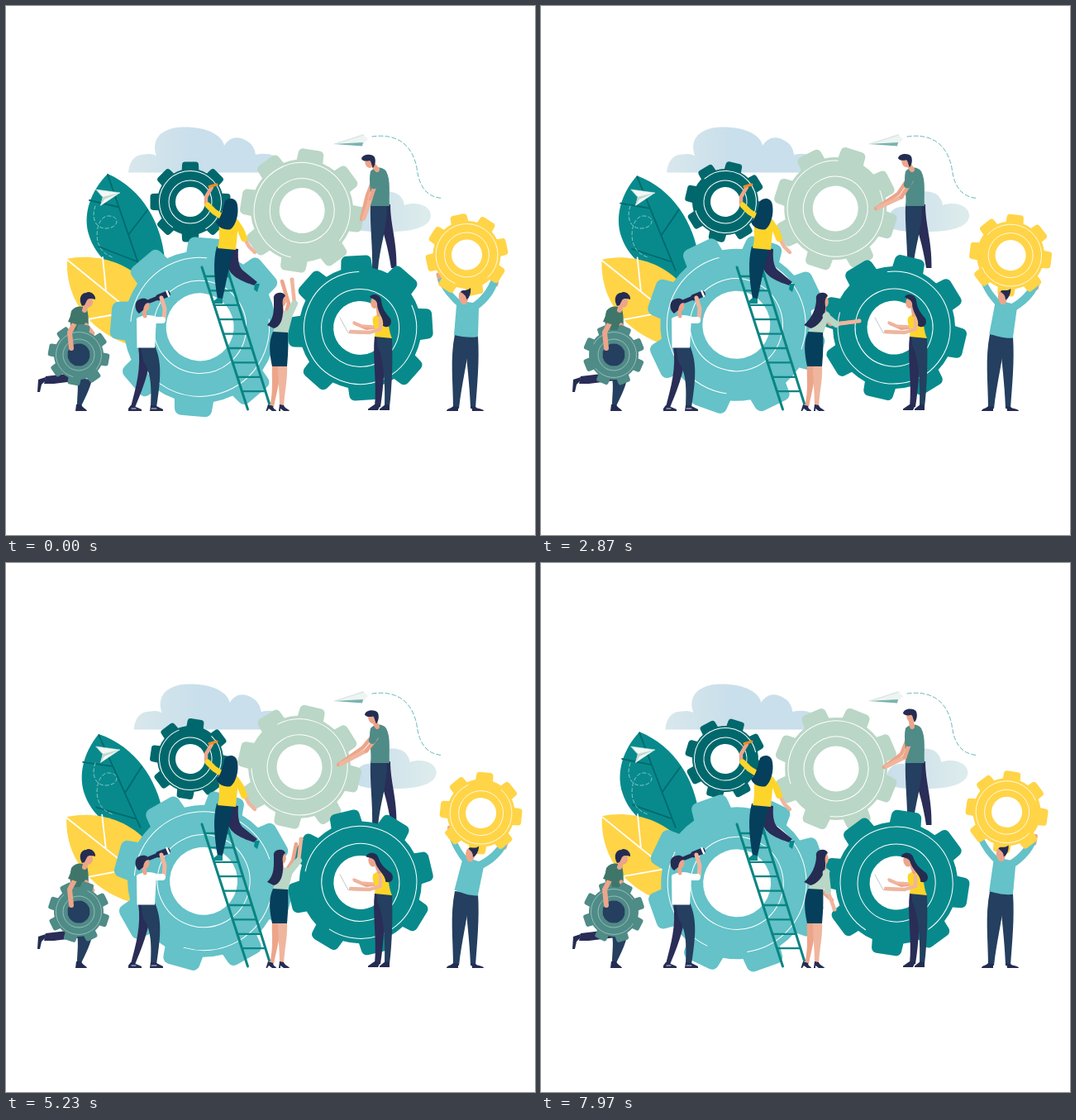
Animation of 640x640 px, one loop 8000 ms. Source, as an HTML page with a canvas:

```html
<!DOCTYPE html>
<html lang="en">
<head>
<meta charset="utf-8">
<title>Team turning gears</title>
<style>
html, body { margin: 0; width: 100%; height: 100%; overflow: hidden; background: #fff; }
canvas { display: block; width: 100%; height: 100%; }
</style>
</head>
<body>
<canvas id="stage"></canvas>
<script>
const canvas = document.getElementById('stage');
const ctx = canvas.getContext('2d');
const LOOP = 8000, TURN = 10, DEG = Math.PI / 180;
const C = {
  aqua: '#64c2c8', teal: '#088a8c', deep: '#00686c', mint: '#bad6c6', yellow: '#ffd447',
  shirt: '#fdd52a', sage: '#4f8b87', navy: '#243f5f', ink: '#292d57', hair: '#242c52',
  petrol: '#053f5b', skin: '#eca58a', pale: '#f0b59d', white: '#fff', green: '#3f7669'
};

// Pose keys, in seconds
const KEYS = [0, 1.17, 2.87, 3.97, 5.23, 6.87, 7.97];

function span(t) {
  let i = 0;
  while (i < KEYS.length - 2 && t > KEYS[i + 1]) i++;
  return [i, Math.min(1, (t - KEYS[i]) / (KEYS[i + 1] - KEYS[i]))];
}
function pose(v, t) {
  const [i, u] = span(t), e = u * u * (3 - 2 * u);
  return v[i] + (v[i + 1] - v[i]) * e;
}
function spin(v, t) {
  const [i, u] = span(t), n = v.length - 1, h = KEYS[i + 1] - KEYS[i];
  const slope = k => {
    const a = Math.max(0, k - 1), b = Math.min(n, k + 1);
    return (v[b] - v[a]) / (KEYS[b] - KEYS[a]) * h;
  };
  const u2 = u * u, u3 = u2 * u;
  return (2 * u3 - 3 * u2 + 1) * v[i] + (u3 - 2 * u2 + u) * slope(i) +
    (3 * u2 - 2 * u3) * v[i + 1] + (u3 - u2) * slope(i + 1);
}

function fill(color, d) {
  ctx.fillStyle = color;
  ctx.fill(new Path2D(d));
}
function line(color, w, d, dash = []) {
  ctx.strokeStyle = color;
  ctx.lineWidth = w;
  ctx.setLineDash(dash);
  ctx.stroke(new Path2D(d));
  ctx.setLineDash([]);
}
function limb(color, w, ...p) {
  line(color, w, 'M' + p.join(' '));
}
function disc(color, x, y, rx, ry = rx, rot = 0) {
  ctx.beginPath();
  ctx.ellipse(x, y, rx, ry, rot, 0, 7);
  ctx.fillStyle = color;
  ctx.fill();
}
function turned(x, y, deg, draw) {
  ctx.save();
  ctx.translate(x, y);
  ctx.rotate(deg * DEG);
  ctx.translate(-x, -y);
  draw();
  ctx.restore();
}
function shifted(x, y, draw) {
  ctx.save();
  ctx.translate(x, y);
  draw();
  ctx.restore();
}
function fade(x0, c0, x1, c1) {
  const g = ctx.createLinearGradient(x0, 0, x1, 0);
  g.addColorStop(0, c0);
  g.addColorStop(1, c1);
  return g;
}

function gear(color, x, y, deg, g) {
  const step = Math.PI / 4, tip = g.tip * 1.02, soft = g.tip * 0.075;
  const at = (r, a) => [r * Math.cos(a), r * Math.sin(a)];
  ctx.save();
  ctx.translate(x, y);
  ctx.rotate(deg * DEG);
  ctx.beginPath();
  ctx.moveTo(...at(g.body, -0.26));
  for (let i = 0; i < 8; i++) {
    const a = i * step;
    ctx.arcTo(...at(tip, a - 0.2), ...at(tip, a + 0.2), soft);
    ctx.arcTo(...at(tip, a + 0.2), ...at(g.body, a + 0.26), soft);
    ctx.lineTo(...at(g.body, a + 0.26));
    ctx.arc(0, 0, g.body, a + 0.26, a + step - 0.26);
  }
  ctx.closePath();
  ctx.moveTo(g.hole, 0);
  ctx.arc(0, 0, g.hole, 0, 2 * Math.PI);
  ctx.fillStyle = color;
  ctx.fill('evenodd');
  ctx.strokeStyle = g.line || C.white;
  ctx.lineWidth = g.width || 1;
  const ring = (r, from, to) => {
    ctx.beginPath();
    ctx.arc(0, 0, r, from * DEG, to * DEG);
    ctx.stroke();
  };
  ring(g.ring, 0, 360);
  for (const [from, to] of g.arcs) ring(g.arc, from, to);
  ctx.restore();
}

const BIG = { tip: 108, body: 92, hole: 41, ring: 56, arc: 84, arcs: [[-101, 56], [90, 181]] };
const RIGHT = { tip: 87.5, body: 74, hole: 32.5, ring: 47, arc: 68, arcs: [[70, 362]] };
const MINT = { tip: 74.5, body: 62, hole: 27.5, ring: 39, arc: 58, arcs: [[185, 480]] };
const SMALL = { tip: 48.5, body: 40, hole: 18, ring: 26, arc: 37.5, arcs: [[215, 510]] };
const GOLD = { tip: 49.5, body: 41, hole: 18.5, ring: 27, arc: 37.5, arcs: [[125, 420]], width: 0.8 };
const LOAD = { tip: 37, body: 30, hole: 13.5, ring: 19, arc: 27.5, arcs: [[95, 390]], width: 0.7, line: '#a9cbc6' };

function clouds(dx) {
  shifted(dx, 0, () => {
    fill(fade(150, '#d8e7ec', 225, '#c9dfeb'),
      'M148 201.5C149 188 156 179 168 179.5C175 178 180 180 182 181C175 162 187 147 214 146.5C244 146 262 157 264 169C270 159 280 157 289 162C298 166 301 173 302 180C315 177 328 180 329 188C329 196 326 200 325 201.5Z');
    fill(fade(420, '#c9dfeb', 505, '#dcebec'),
      'M417 266C413 250 424 241 437 243C440 228 454 222 467 225C477 227 481 234 482 241C496 236 514 241 514 254C513 268 490 273 465 273C440 274 420 272 417 266Z');
  });
}

function leaves(sway, wave) {
  turned(162, 325, -5.2 * sway, () => {
    fill(C.teal, 'M123 203C102 224 93 252 100 276C108 305 135 325 165 335L192 306C188 264 166 222 123 203Z');
    line('#016a6e', 1.8, 'M123 204L163 320M148 277L171 247M135 243L101 235M158 309L112 291');
  });
  turned(165, 358, 2.9 * wave, () => {
    fill(C.yellow, 'M74 306C100 300 141 305 168 334L160 413C108 400 71 360 74 306Z');
    line(C.white, 1.8, 'M74 307L154 372M117 304L121 345M99 379L150 370');
  });
}

function planes() {
  line('#83c9c8', 1, 'M108 242C103 256 108 270 122 269C137 268 138 254 124 254C112 254 107 275 112 288C115 296 119 300 129 304', [4, 3]);
  fill('#f3f8f6', 'M109 222L138 226L114 242L117 231Z');
  fill('#bfd8cf', 'M138 226L117 231L114 242L119 234Z');
  line('#d7e5df', 0.6, 'M109 222L138 226L117 231Z');
  line('#69b8b7', 1, 'M443 158C470 154 491 165 497 196C500 220 510 231 527 232.5', [5, 3]);
  fill('#eef4f2', 'M397 167L431 155L438 161L431 168Z');
  fill('#7ab3af', 'M397 167L432 165L431 169.5Z');
  line('#c8dcd6', 0.7, 'M397 167L433 156');
}

function ladder() {
  line('#0a8583', 3, 'M237 316L292.5 488M267 316L318.5 481');
  for (let y = 327; y < 470; y += 17.4) {
    line('#0a8583', 2.3, `M${237 + (y - 315) * 0.32} ${y}L${267 + (y - 315) * 0.31} ${y}`);
  }
}

function climber() {
  fill(C.ink, 'M266 292L281 294C280 308 282 317 288 321L304 334L300 338C286 333 272 328 268 315Z');
  fill(C.petrol, 'M255 291L276 294C271 309 267 332 262 354L256 354C252 332 250 308 255 291Z');
  fill(C.teal, 'M256 353L262 354L262 360L250 360L250 358Z');
  fill(C.teal, 'M301 336L307 336L304 346L300 343Z');
  limb(C.skin, 4.5, 249, 219, 242, 231, 242, 239);
  line('#ef8d22', 3, 'M246 218.5L255 216');
  limb(C.shirt, 7, 244, 241, 252, 249, 263, 256);
  limb(C.pale, 4.5, 288, 280, 294, 291, 301, 298);
  limb(C.shirt, 8, 278, 262, 284, 271, 288, 281);
  fill(C.shirt, 'M259 254C268 251 279 255 281 264L278 295L256 293C260 281 256 268 259 254Z');
  fill(C.petrol, 'M265 236C270 231 279 232 280 241C282 252 278 265 272 270C265 272 256 268 254 261C261 257 262 244 265 236Z');
}

function runner(deg) {
  fill(C.ink, 'M82 444L48 448L46 457L58 457L90 453Z');
  fill(C.hair, 'M39 452L48 449L47 454L43 458L41 467L38 467Z');
  fill(C.navy, 'M86 450L104 452C101 465 94 477 91 484L86 484C86 472 88 461 86 450Z');
  fill(C.hair, 'M85 482L91 482C92 486 97 487 98 490L84 490Z');
  fill(C.green, 'M79 369C84 362 94 362 98 367C101 377 99 390 100 402L76 402C80 390 76 380 79 369Z');
  limb(C.skin, 5, 97, 386, 105, 396);
  limb(C.skin, 6, 95, 368, 97, 362);
  disc(C.skin, 99, 358, 6, 7);
  fill(C.hair, 'M92 363C87 354 91 347 97 347C101 344 109 349 108 355C104 354 100 353 98 356L95 362Z');
  gear(C.sage, 88, 422, deg, LOAD);
  disc(C.navy, 88, 422, 13.7);
  limb(C.skin, 6, 85, 380, 77, 395, 79, 414);
  fill(C.green, 'M80 370L92 372L88 386L75 382Z');
}

function watcher() {
  fill(C.ink, 'M160 412L175 413C176 437 165 464 156 486L151 485C157 462 164 438 160 412Z');
  fill(C.navy, 'M163 412L180.5 412C188 431 188 447 182 486L175 486C176 461 176 444 166 430Z');
  fill(C.hair, 'M151 483L157 485L164 488V490H148V487Z');
  fill(C.hair, 'M175 483L182 484L190 488V490H174Z');
  line(C.white, 0.8, 'M152 487H157M176 487H182');
  fill(C.white, 'M158 378C165 373 176 373 182 376L180 413.5H158.5Z');
  limb(C.skin, 5, 168, 375, 167, 368);
  disc(C.skin, 168, 363, 5.5, 7);
  fill(C.hair, 'M161 372C155 368 155 357 161 355C168 352 173 355 173 359C169 359 167 362 166 368Z');
  line(C.hair, 5, 'M174 357L184 353');
  line(C.hair, 7.5, 'M185 352.5L195 348.5');
  line(C.white, 2.5, 'M194.5 345L197 351');
  limb(C.pale, 5, 191, 379, 192, 366, 188, 353);
  limb(C.white, 8, 176, 380, 189, 380);
}

function topMan(t) {
  const nod = pose([0, 3, 2, 1, 4, 8, 8], t);
  const hx = pose([433, 420, 408, 429, 405, 414, 418], t);
  const hy = pose([257, 188, 244, 254, 243, 196, 246], t);
  const ex = pose([441, 426, 436, 441, 436, 430, 440], t);
  const ey = pose([233, 223, 231, 232, 227, 225, 235], t);
  limb(C.skin, 4.5, 446, 206, ex - 4, ey - 4, hx - 3, hy + 1);
  fill(C.ink, 'M452 240L465 240C465 265 473 284 472.5 317L466 317C462 290 456 272 452 260Z');
  fill(C.navy, 'M441 240L461 240C462 267 452 291 450 319L443 319C444 292 440 266 441 240Z');
  fill(C.sage, 'M441 200C446 194 456 194 460 200C466 211 463 228 464 242L441 242C443 228 438 212 441 200Z');
  limb(C.skin, 6, 449, 198, 443 + nod * 0.6, 191);
  shifted(nod, nod * -0.4, () => {
    disc(C.skin, 439.5, 189, 5.2, 7, -0.2);
    fill(C.hair, 'M430 185C431 179 443 178 446 183C448 188 446 194 444 196C442 192 442 188 440 187C436 188 432 188 430 185Z');
  });
  limb(C.pale, 5, ex, ey, hx, hy);
  limb(C.skin, 5, 448, 212, ex, ey);
  limb(C.sage, 9, 448, 206, 448 + (ex - 448) * 0.4, 206 + (ey - 206) * 0.4);
}

function pusher(t) {
  const lean = pose([0, 8, 9, 1, 0, 1, 9], t);
  const hx = pose([346, 369, 385, 350, 357, 382, 355], t);
  const hy = pose([331, 340, 381, 333, 334, 366, 419], t);
  const ex = pose([349, 357, 357, 350, 354, 357, 347], t);
  const ey = pose([360, 366, 385, 361, 360, 375, 397], t);
  const bx = pose([334, 357, 380, 339, 351, 377, 352], t);
  const by = pose([333, 340, 382, 335, 340, 368, 408], t);
  const sx = 340 + lean * 0.3;
  limb(C.skin, 4.5, sx - 2, 374, ex - 7, ey, bx, by);
  fill(C.skin, 'M322 434L332 434C332 454 327 469 324 485L319 485C324 465 321 448 322 434Z');
  fill(C.pale, 'M329 434L340 434C341 452 337 465 336 485L331 485C331 466 329 452 329 434Z');
  fill(C.hair, 'M317 482L323 484C323 488 327 488 327 490H322L318 487L316 490H314.5Z');
  fill(C.hair, 'M331 482L336 483C337 487 343 488 343 490H336L332 487V490H330Z');
  fill(C.mint, `M${sx - 13} 376C${sx - 8} 366 ${sx + 4} 367 ${sx + 7} 373L341 397L323 396Z`);
  fill(C.petrol, 'M323 394L341 395C342 408 341 424 340 436L322 436C319 422 317 407 323 394Z');
  shifted(lean, lean * 0.1, () => {
    limb(C.skin, 4.5, 334, 370, 333, 363);
    disc(C.skin, 334, 357, 4.8, 7);
  });
  const q = lean * 0.25, h = lean;
  fill(C.hair, `M${324 + h} 355C${322 + h} 346 ${336 + h} 344 ${338 + h} 351C${335 + h} 353 ${334 + h} 356 ${335 + h} 363C${336 + h} 376 ${333 + q} 388 ${324 + q} 390L${316 + q} 386C${325 + q} 378 ${324 + h} 366 ${324 + h} 355Z`);
  limb(C.pale, 4.5, ex, ey, hx, hy);
  disc(C.pale, hx, hy, 2.5);
  limb(C.mint, 8, sx + 2, 375, ex, ey);
}

function typist(t) {
  const tilt = pose([0, 1, 0, 0, 1, 1, 1], t);
  limb(C.skin, 4, 452, 388, 436, 390, 422, 384);
  fill(C.ink, 'M446 399L460 400C458 432 457 461 453 485L446 485C449 456 443 424 446 399Z');
  fill(C.navy, 'M449 399L467 401C468 430 467 460 464 485L458 485C459 455 457 427 449 410Z');
  fill(C.hair, 'M446 482L453 483L450 489H438V487.5Z');
  fill(C.hair, 'M459 482L464 483V489H452V487.5Z');
  fill(C.shirt, 'M444 377C450 371 459 372 461 378C464 387 463 393 467 402L446 400C448 390 442 385 444 377Z');
  turned(452, 372, -13 * tilt, () => {
    limb(C.skin, 4.5, 451, 374, 450, 366);
    disc(C.skin, 446, 359, 4.8, 7);
    fill(C.hair, 'M440 352C442 347 453 348 454 356C455 366 459 371 465 378C468 385 463 391 456 387C458 378 449 371 449 360C448 355 444 355 440 352Z');
  });
  fill(C.white, 'M404 377L414 396L432 397L424 395L415 393Z');
  line('#b9cbd0', 1, 'M404 377L414 395.5L433 396.5');
  limb(C.pale, 4.3, 453, 379, 453, 391, 440, 395, 417, 394);
  limb(C.pale, 3.5, 444, 388, 430, 387, 421, 383);
}

function lifter(sway, deg) {
  fill(C.navy, 'M555 397L571 400C573 430 570 459 568 487L562 487C561 456 557 430 555 397Z');
  fill(C.navy, 'M543 397L562 399C558 431 551 459 548 487L541 487C541 455 537 427 543 397Z');
  fill(C.hair, 'M541 484L547 485V490H533C533 487 539 487 541 484Z');
  fill(C.hair, 'M563 484L568 485C571 488 578 487 578 490H564Z');
  turned(557, 400, 10 * sway, () => {
    limb(C.skin, 5, 526, 336, 523, 325);
    limb(C.skin, 5, 593, 337, 594, 328);
    fill(C.aqua, 'M545 362C536 354 528 344 522 331L528 328C534 340 541 349 551 357L565 359C575 352 583 342 588 328L596 332C591 349 581 359 572 366L571 400C562 402 550 400 542 398Z');
    gear(C.yellow, 557.5, 301, deg, GOLD);
    fill(C.skin, 'M548 349C548 343 560 343 560 350C560 355 558 357 557 361L552 361C549 357 547 354 548 349Z');
    fill(C.hair, 'M550 346C552 342 557 346 562 341C563 348 560 354 557 355C557 350 553 348 550 346Z');
  });
}

function draw(t) {
  const a = 2 * Math.PI * t / TURN, deg = 360 * t / TURN;
  const sway = (1 - Math.cos(a)) / 2;
  ctx.fillStyle = C.white;
  ctx.fillRect(0, 0, 640, 640);
  ctx.lineCap = ctx.lineJoin = 'round';
  clouds(6.7 * sway);
  leaves(sway, Math.cos(2 * a - 1.6 * Math.PI) - 0.31);
  planes();
  gear(C.deep, 223, 237, deg - 90, SMALL);
  gear(C.mint, 356.6 + 1.6 * Math.cos(a), 247 - 1.9 * Math.sin(a - 0.26),
    -81 + spin([0, -48, -126, -170, -221, -271, -302], t), MINT);
  gear(C.aqua, 236.8 - 2.4 * Math.cos(a - 0.44), 386.5 + 1.9 * Math.cos(a + 0.17),
    94.6 + 36.5 * t, BIG);
  topMan(t);
  gear(C.teal, 428.6 - 1.6 * Math.sin(a), 388 + 2 * Math.cos(a - 0.78),
    -93.5 + spin([0, -26, -73, -111, -145, -185, -213], t), RIGHT);
  ladder();
  climber();
  runner(deg + 10);
  watcher();
  pusher(t);
  typist(t);
  lifter(sway, deg - 12.4);
}

function resize() {
  const r = window.devicePixelRatio || 1;
  canvas.width = Math.round(innerWidth * r);
  canvas.height = Math.round(innerHeight * r);
}
function tick() {
  ctx.setTransform(canvas.width / 640, 0, 0, canvas.height / 640, 0, 0);
  draw(performance.now() % LOOP / 1000);
  requestAnimationFrame(tick);
}
addEventListener('resize', resize);
resize();
tick();
</script>
</body>
</html>
```
